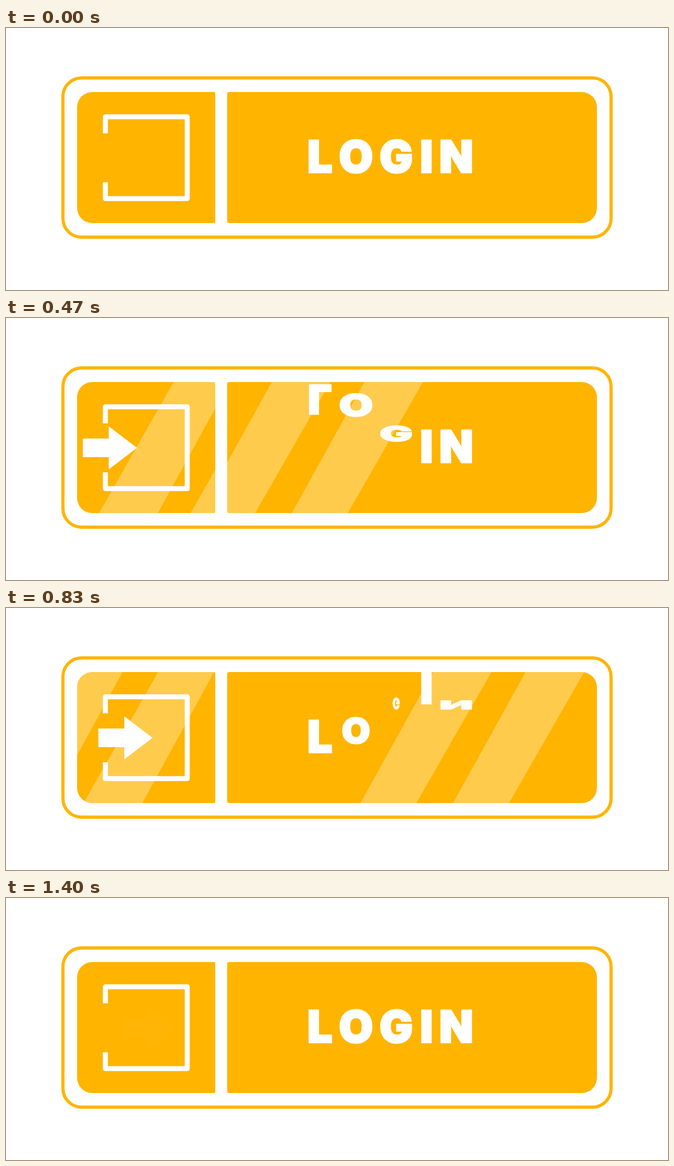
An HTML page that plays this animation: 1136 by 450 pixels, repeating every 1.43 s.

```html
<!DOCTYPE html>
<html lang="en">
<head>
<meta charset="utf-8">
<title>Login button</title>
<style>
  html, body { margin: 0; width: 100%; height: 100%; overflow: hidden; background: #fff; }
  svg { display: block; width: 1136px; height: 450px; }
  .amber { fill: #ffb400; }
  .gleam { fill: #fff; fill-opacity: .3; }
  .frame { fill: none; stroke: #ffb400; stroke-width: 5.4; }
  .bracket { fill: none; stroke: #fff; stroke-width: 8.6; stroke-linejoin: round; }
  text {
    font: 900 75.6px Inter, "Liberation Sans", sans-serif;
    font-optical-sizing: none;
    text-anchor: middle;
    fill: #fff;
    stroke: #fff;
    stroke-width: 3;
  }
</style>
</head>
<body>
<svg viewBox="0 0 1136 450">
  <defs>
    <path id="leftPanel" d="M148 110H357q2 0 2 2V333q0 2-2 2H148a26 26 0 0 1-26-26V136a26 26 0 0 1 26-26z"/>
    <path id="rightPanel" d="M383 110H988a26 26 0 0 1 26 26V309a26 26 0 0 1-26 26H383q-3.5 0-3.5-3.5V113.500q0-3.500 3.500-3.500z"/>
    <clipPath id="leftClip"><use href="#leftPanel"/></clipPath>
    <clipPath id="rightClip"><use href="#rightPanel"/></clipPath>
    <path id="leftBand" class="gleam" d="M0 335L128 110H224L101 335z"/>
    <path id="rightBand" class="gleam" d="M0 335L124.500 110H225L96 335z"/>
  </defs>

  <rect class="frame" x="97.7" y="85.7" width="940.6" height="273.6" rx="32"/>
  <use href="#leftPanel" class="amber"/>
  <use href="#rightPanel" class="amber"/>

  <g clip-path="url(#leftClip)">
    <g id="leftGleam"><use href="#leftBand"/><use href="#leftBand" x="157"/></g>
    <path class="bracket" d="M170.500 181V152.500H311V293H170.500V265"/>
    <path id="arrow" fill="#fff" d="M0 223L-48.500 260V239H-93V207H-48.500V186z"/>
  </g>
  <g clip-path="url(#rightClip)">
    <g id="rightGleam"><use href="#rightBand"/><use href="#rightBand" x="-159"/></g>
  </g>
  <g id="word" aria-label="LOGIN"></g>
</svg>

<script>
const LOOP = 1430, FPS = 30;
const AXIS = 178;                 // horizontal line the letters flip around
const START = 2.05, STAGGER = 4.2, DEGREES = 17.15;   // in steps
const LETTERS = [['L', 538.5], ['O', 600.5], ['G', 669.5], ['I', 721.5], ['N', 772.5]];

const $ = id => document.getElementById(id);
const clamp = (v, lo, hi) => Math.min(hi, Math.max(lo, v));
const shift = (el, x) => el.setAttribute('transform', `translate(${x} 0)`);

const letters = LETTERS.map(([char, x]) => {
  const el = document.createElementNS('http://www.w3.org/2000/svg', 'text');
  el.textContent = char;
  el.setAttribute('y', 69.5);
  $('word').append(el);
  return { el, x };
});

function flip({ el, x }, i, step) {
  const deg = clamp((step - START - i * STAGGER) * DEGREES, 0, 360);
  const angle = deg * Math.PI / 180;
  // On the way back down the letter also narrows to a line and opens again.
  const narrow = deg > 180 ? 1 - Math.abs(Math.sin(angle)) ** 3.8 : 1;
  el.setAttribute('transform', `translate(${x} ${AXIS}) scale(${narrow} ${Math.cos(angle)})`);
}

function draw(now) {
  const step = Math.floor((now % LOOP + 4) * FPS / 1000) % 43;
  shift($('leftGleam'), 393.5 - 16.7 * step);
  shift($('rightGleam'), 138.4 + 25.15 * step);
  shift($('arrow'), 190.9 + 2.423 * step);
  $('arrow').setAttribute('opacity', clamp(Math.min(step / 4, (42.1 - step) / 5), 0, 1));
  letters.forEach((letter, i) => flip(letter, i, step));
}

const begin = performance.now();
function tick() {
  draw(performance.now() - begin);
  requestAnimationFrame(tick);
}
tick();
</script>
</body>
</html>
```
